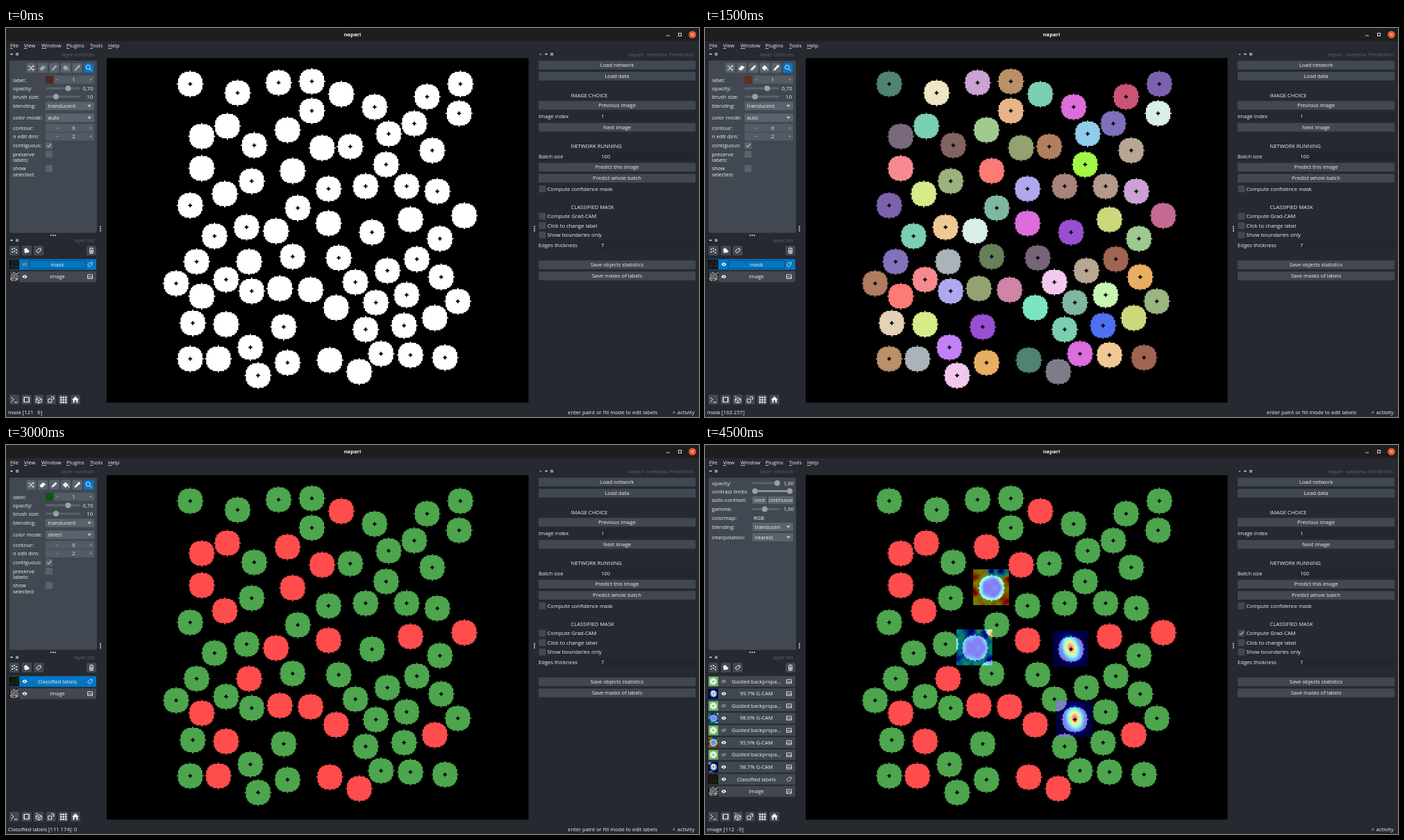
Recreate the animation shown at these times as an HTML page with a canvas. Size 998 px wide and 561 px high, loop 6 s.

```html
<!DOCTYPE html>
<html lang="en">
<head>
<meta charset="utf-8">
<title>napari</title>
<style>
html, body { margin: 0; width: 100%; height: 100%; overflow: hidden; background: #262930; }
canvas { display: block; }
</style>
</head>
<body>
<canvas id="stage" width="998" height="561"></canvas>
<script>
const ctx = document.getElementById('stage').getContext('2d');
const BG = '#262930', PANEL = '#414851', FIELD = '#5a626c', INK = '#f0f1f2',
  DIM = '#7d858c', FAINT = '#5d636c', BLUE = '#0077c6';
const PX = 1.844, LEFT = 245, TOP = 77;   // view of the image: pixel size and origin

// Cells with a dark cross: column, row, label colour
const marked = [
  [11, 2, '#4f8374'], [48, 9, '#eee6c4'], [80, 1, '#cba2d4'], [106, 0, '#bb9069'], [155, 20, '#dc6ddb'],
  [196, 12, '#cb5474'], [222, 2, '#7c62ae'], [221, 25, '#daeee8'], [106, 23, '#e7b588'], [186, 33, '#8070b9'],
  [166, 41, '#8fcdea'], [61, 50, '#836362'], [136, 51, '#b17e60'], [200, 54, '#b8a693'], [164, 65, '#a2f846'],
  [59, 78, '#9cb37e'], [119, 84, '#b0a8ee'], [148, 82, '#a8837a'], [180, 82, '#b39a8b'], [204, 86, '#cba3d3'],
  [11, 97, '#7c62ae'], [95, 99, '#7fb8a0'], [55, 114, '#efc995'], [30, 121, '#7bcfb1'], [153, 118, '#984fd1'],
  [206, 123, '#9eca92'], [16, 141, '#8272bb'], [91, 137, '#67805a'], [127, 138, '#766578'], [188, 139, '#a06550'],
  [165, 148, '#b8a793'], [207, 153, '#e9ae62'], [0, 158, '#b17b5f'], [39, 155, '#f68a90'], [59, 164, '#b0a8ee'],
  [140, 157, '#f3c8ee'], [156, 173, '#7fb8a0'], [180, 167, '#c8f5b4'], [220, 172, '#9ab580'], [13, 189, '#e4d1b6'],
  [84, 192, '#984fd1'], [148, 194, '#7bcfb1'], [178, 191, '#4f70f0'], [58, 208, '#c281f6'], [11, 217, '#bb9069'],
  [87, 220, '#e9ae62'], [64, 230, '#f3c8ee'], [160, 213, '#dc6ddb'], [183, 214, '#efc995'], [210, 216, '#a06550']];
const plain = [
  [129, 10, '#7bcfb1'], [40, 35, '#7bcfb1'], [20, 43, '#7a697c'], [87, 38, '#9fcb91'], [114, 52, '#92a371'],
  [20, 68, '#f68a90'], [91, 70, '#fc7b74'], [38, 88, '#d6ec88'], [119, 111, '#dc6ddb'], [183, 108, '#cdd87c'],
  [225, 105, '#c46a92'], [78, 117, '#daeee8'], [57, 141, '#abb3b9'], [20, 168, '#fc7b74'], [81, 162, '#92a371'],
  [105, 163, '#cf84a8'], [125, 177, '#7be5c1'], [202, 185, '#cdd87c'], [39, 190, '#d6ec88'], [33, 217, '#abb3b9'],
  [120, 218, '#4f8374'], [143, 227, '#7f7c8a']];
const cells = [...marked.map(c => [...c, true]), ...plain.map(c => [...c, false])];

const disk = new Path2D();
for (let dy = 0; dy <= 10; dy++) {
  const w = Math.floor(Math.sqrt(100 - dy * dy)) + .5;
  disk.rect(-w, -dy - .5, 2 * w, 2 * dy + 1);
}

const icons = {
  shuffle: 'M-4-2.5h2l3.5 5h2M-4 2.5h2l3.5-5h2M2.5-4l1.5 1.5L2.5-1M2.5 1L4 2.5 2.5 4',
  tag: 'M-3.5 1L0-2.7l3-.3v3L-.5 3.5z',
  picture: 'M-3.5-2.8h7v5.6h-7zM-3 2l2-2.5 2 1.7 1-1L3 2',
  zoom: 'M2-1A3 3 0 1 1-4-1 3 3 0 1 1 2-1M1 1l3.3 3.3',
  trash: 'M-3-3h6M-1-4h2M-2.5-2l.4 6h4.2l.4-6M-.8-1v4M.8-1v4',
  console: 'M-4.5-3.5L-1 0l-3.5 3.5M0 3.8h4.5',
  square: 'M-3.5-3.5h7v7h-7z',
  cube: 'M-4-1L0-3l4 2v4L0 5l-4-2zM-4-1l4 2 4-2M0 1v4M-4-4l2-1',
  turn: 'M-4-1h5v5h-5zM0-4h4v4M2.5-1.5L4 0',
  check: 'M-2.6 0l2 2.2L2.8-2.4',
  cross: 'M-1.8-1.8l3.6 3.6M1.8-1.8l-3.6 3.6',
  eraser: 'M-4.5 1L0-3.5 4.5-1 0 3.5h-3z',
  brush: 'M-4 4l1-3 5-5 2 2-5 5z',
  bucket: 'M-4.5 0l4-4L4 0-.5 4zM4 1l1.2 2.6H3z',
  picker: 'M-4 4l.6-2.4 4-4 1.8 1.8-4 4zM0-3l3 3 1.5-2.5L2.5-4.500z',
  eye: 'M-3.7 0Q0-4.800 3.7 0 0 4.800-3.700 0z',
  shape: 'M-4-2l3-2 5 5-2 2-5 .5z',
  home: 'M-5 0L0-4.800 5 0H3.500v4.500h-2.300V1h-2.400v3.500h-2.300V0z',
  arrow: 'M-3-1.800h6L0 1.900z'
};
const solid = ['eraser', 'brush', 'bucket', 'picker', 'eye', 'shape', 'home', 'arrow'];

function box(x, y, w, h, color, r = 1) {
  ctx.fillStyle = color;
  ctx.beginPath();
  ctx.roundRect(x, y, w, h, r);
  ctx.fill();
}
function dot(x, y, r, color) {
  ctx.fillStyle = color;
  ctx.beginPath();
  ctx.arc(x, y, r, 0, 7);
  ctx.fill();
}
function text(s, x, y, align = 'left', color = INK, font = '7.6px') {
  ctx.font = font + ' "Open Sans", "Noto Sans", sans-serif';
  ctx.textAlign = align;
  ctx.fillStyle = color;
  ctx.fillText(s, x, y + 2.6);
}
function icon(name, x, y, color = INK) {
  ctx.save();
  ctx.translate(x, y);
  ctx.fillStyle = ctx.strokeStyle = color;
  const path = new Path2D(icons[name]);
  if (solid.includes(name)) ctx.fill(path); else ctx.stroke(path);
  ctx.restore();
}
function iconButton(name, x, y, color, bg = PANEL) {
  box(x - 7, y - 7, 14, 14, bg, 1.5);
  if (name) icon(name, x, y, color);
}
function button(s, y, x = 767, w = 226) {
  box(x, y - 6.3, w, 12.6, PANEL);
  text(s, x + w / 2, y, 'center');
}
function checkbox(x, y, on, bg) {
  box(x - 5, y - 5, 10, 10, bg);
  if (on) icon('check', x, y);
}
function slider(x, y, w, ...knobs) {
  box(x, y - 1.5, w, 3, FIELD, 1.5);
  if (knobs[1]) box(knobs[0], y - 1.5, knobs[1] - knobs[0], 3, '#868e93');
  knobs.forEach(k => dot(k, y, 4, '#9ba1a7'));
}
function spin(value, x, y) {
  box(x, y - 5.7, 127 - x, 11.4, '#535b65');
  text('−', 74, y, 'center', '#b5babf');
  text(value, 97.5, y, 'center');
  text('+', 122, y, 'center', '#b5babf');
}
function combo(value, x, y) {
  box(x, y - 6, 127 - x, 12, FIELD);
  text(value, x + 3.5, y);
  icon('arrow', 120, y, '#b9bec3');
}

const clamp = v => Math.max(0, Math.min(1, v));
const jet = v => [3, 2, 1].map(k => 255 * clamp(1.5 - Math.abs(4 * clamp(v) - k)));
const hot = tilt => (x, y) => .88 * Math.exp(-(x * x + .55 * (y + 1) ** 2 - tilt * x * y) / 33);
// Cold centre, uneven surroundings; blobs are [x, y, radius, height]
const cold = (level, blobs) => (x, y) => {
  const r = Math.hypot(x, y), edge = clamp((r - 6.5) / 4.5);
  let v = level + .07 * Math.sin(x * .8 + y * .3) * Math.cos(y * .7);
  for (const [bx, by, br, h] of blobs) v += h * Math.exp(-((x - bx) ** 2 + (y - by) ** 2) / br / br);
  return .13 + .04 * Math.sin(x * .6) * Math.cos(y * .5) + (v - .13) * edge;
};
const maps = [
  { x: 153, y: 118, heat: hot(.35) },
  { x: 78, y: 117, heat: cold(.38, [[-4, -13, 4, -.3], [8, -10, 4, -.25], [13, -11, 3, .5], [-13, 7, 4, -.2], [12, 9, 4, -.25]]) },
  { x: 91, y: 70, heat: cold(.64, [[0, -13, 3, -.55], [7, -13, 4, -.5], [13, -13, 3, -.3], [-14, 3, 3, .3], [-14, -9, 3, .25], [13, -6, 3, .3], [11, 10, 4, .25]]) },
  { x: 156, y: 173, heat: hot(.15) }];

function heatmap(map, cx, cy, s) {
  for (let y = -14; y < 14; y++) for (let x = -14; x < 14; x++) {
    const hit = cells.find(c => Math.hypot(map.x + x - c[0], map.y + y - c[1]) <= 10);
    const core = hit && hit[3] && Math.abs(map.x + x - hit[0]) + Math.abs(map.y + y - hit[1]) <= 1;
    const rgb = jet(map.heat(x, y)).map(v => core ? 0 : (v + (hit ? 255 : 0)) / 2);
    ctx.fillStyle = `rgb(${rgb})`;
    ctx.fillRect(cx + (x - .5) * s, cy + (y - .5) * s, s + (x < 13 ? .4 : 0), s + (y < 13 ? .4 : 0));
  }
}

const classColor = c => c[3] ? '#4da64d' : '#ff4d4d';

function drawCells(color) {
  for (const c of cells) {
    ctx.save();
    ctx.translate(LEFT + c[0] * PX, TOP + c[1] * PX);
    ctx.scale(PX, PX);
    ctx.fillStyle = color(c);
    ctx.fill(disk);
    if (c[3]) {
      ctx.fillStyle = '#000';
      ctx.fillRect(-1.5, -.5, 3, 1);
      ctx.fillRect(-.5, -1.5, 1, 3);
    }
    ctx.restore();
  }
}

function thumbnail(kind, y) {
  if (kind.heat) return heatmap(kind, 12.2, y + .2, .5);
  if (kind === 'guided') {
    box(5, y - 7, 14, 14, '#69b569', 0);
    dot(12, y, 5, '#d9f4d4');
    return dot(12, y, 1, '#3b7a3b');
  }
  box(5, y - 7, 14, 14, '#000', 0);
  ctx.globalAlpha = kind === 'image' ? 1 : .45;
  for (const c of cells) {
    ctx.fillStyle = kind === 'classes' ? classColor(c) : kind === 'image' ? '#fff' : '#999';
    ctx.fillRect(5.5 + c[0] / 18.5, y - 6.5 + c[1] / 19, 1.1, .9);
  }
  ctx.globalAlpha = 1;
}

function layer(i, name, thumb, { selected, editing, hidden, type = 'picture' } = {}) {
  const y = 341 + i * 17.63, bg = selected ? BLUE : PANEL;
  box(5, y - 7.8, 125, 15.6, bg);
  thumbnail(thumb, y);
  if (editing) {
    ctx.strokeStyle = '#174a75';
    ctx.strokeRect(33.5, y - 5.5, 81, 11);
  }
  icon('eye', 27, y, hidden ? DIM : INK);
  dot(27, y, 1, bg);
  if (hidden) {
    ctx.strokeStyle = DIM;
    ctx.beginPath();
    ctx.moveTo(24, y + 2.5);
    ctx.lineTo(30, y - 2.5);
    ctx.stroke();
  }
  text(name, 74, y, 'center');
  icon(type, 121, y, '#d5d8da');
}

function dockTitle(s, right, x, y, closable) {
  text(s, right, y, 'right', FAINT, '7.5px');
  if (closable) text('×', x - 8, y - .5, 'center', INK, '6px');
  box(x - 1.7, y - 1.2, 3.4, 1.6, '#d0d3d6', .5);
  ctx.strokeStyle = '#d0d3d6';
  ctx.strokeRect(x + 6.8, y - 1.5, 2.5, 2.5);
}

function drawFrame() {
  box(0, 0, 998, 561, BG, 0);
  box(0, 0, 998, 19, '#1f1e1e', 0);
  text('napari', 499, 9.5, 'center', INK, '700 7.6px');
  box(951, 10.5, 5, 1, '#d8d8d8', 0);
  ctx.strokeStyle = '#d8d8d8';
  ctx.strokeRect(968.5, 7.5, 4, 4);
  dot(988.500, 9.500, 5.300, '#e95a2b');
  icon('cross', 988.500, 9.500);

  [['File', 6], ['View', 26], ['Window', 51], ['Plugins', 87], ['Tools', 121], ['Help', 147]].forEach(([s, x]) => {
    text(s, x, 25.500);
    box(x, 29.300, ctx.measureText(s[0]).width, .7, INK, 0);
  });

  dockTitle('layer controls', 127, 8, 38);
  dockTitle('layer list', 127, 8, 306.500);
  dockTitle('napari  svetlana: Prediction', 991, 778, 38, true);
  [-3, 0, 3].forEach(d => {
    dot(68 + d, 299, .9, INK);
    dot(136, 289.500 + d, .9, INK);
    dot(761, 289.500 + d, .9, INK);
  });

  iconButton('', 12, 321);
  [[-3, -2], [0, -3], [3, -1], [-3, 2], [0, 1], [3, 3]].forEach(([x, y]) => dot(12 + x, 321 + y, 1, INK));
  iconButton('shape', 30, 321);
  iconButton('tag', 47, 321);
  iconButton('trash', 123, 321);
  ['console', 'square', 'cube', 'turn', '', 'home'].forEach((n, i) => iconButton(n, 12 + i * 17.600, 536));
  for (let i = 0; i < 9; i++) box(78 + i % 3 * 3.500, 531.600 + Math.floor(i / 3) * 3.500, 2.400, 2.400, INK, 0);
  icon('square', 29.600, 536);
}

function drawPlugin(gradCam) {
  [['Load network', 53.500], ['Load data', 69.500], ['Previous image', 111.500], ['Next image', 143.200],
   ['Predict this image', 200.800], ['Predict whole batch', 216.800], ['Save objects statistics', 341.500],
   ['Save masks of labels', 357.500]].forEach(([s, y]) => button(s, y));
  [['IMAGE CHOICE', 97], ['NETWORK RUNNING', 170.500], ['CLASSIFIED MASK', 258]].forEach(([s, y]) => text(s, 813.500, y));
  [['Image index', '1', 127.500], ['Batch size', '100', 185], ['Edges thickness', '7', 313]].forEach(([s, v, y]) => {
    box(854, y - 6, 139, 12, '#22252b');
    text(s, 767, y);
    text(v, 857, y);
  });
  [['Compute confidence mask', 232], ['Compute Grad-CAM', 271.500, gradCam], ['Click to change label', 285],
   ['Show boundaries only', 298.500]].forEach(([s, y, on]) => {
    checkbox(772.500, y, on, PANEL);
    text(s, 779.500, y);
  });
}

const caption = (s, y) => text(s, 10, y);

function labelControls({ swatch, mode, disabled }) {
  ['shuffle', 'eraser', 'brush', 'bucket', 'picker', 'zoom'].forEach((n, i) =>
    iconButton(n, 36.300 + i * 16.600, 57.500, disabled && i > 0 && i < 5 ? '#a0a5aa' : INK, i === 5 ? BLUE : FIELD));
  [['label:', 75], ['opacity:', 87], ['brush size:', 99], ['blending:', 112.500], ['color mode:', 129.500],
   ['contour:', 144], ['n edit dim:', 156.500], ['contiguous:', 169.500], ['preserve', 182], ['labels:', 190.500],
   ['show', 202.500], ['selected:', 211]].forEach(([s, y]) => caption(s, y));
  box(57, 69.300, 11, 11, swatch, 0);
  spin('1', 69, 74.500);
  slider(57, 87, 50, 89.500);
  text('0,70', 125.500, 87, 'right');
  slider(57, 99, 50, 72);
  text('10', 125, 99, 'right');
  combo('translucent', 57, 112.500);
  combo(mode, 57, 129.500);
  spin('0', 57, 144);
  spin('2', 57, 156.500);
  checkbox(62, 169.500, true, FIELD);
  checkbox(62, 182, false, FIELD);
  checkbox(62, 202.500, false, FIELD);
}

function imageControls() {
  [['opacity:', 55], ['contrast limits:', 67], ['auto-contrast:', 79.500], ['gamma:', 92.500], ['colormap:', 105],
   ['blending:', 118], ['interpolation:', 133]].forEach(([s, y]) => caption(s, y));
  slider(68, 55, 40, 104);
  text('1,00', 113, 55);
  slider(68, 66.500, 58, 72, 122);
  [['once', 68, 21], ['continuous', 91, 36]].forEach(([s, x, w]) => {
    box(x, 74, w, 11, FIELD);
    text(s, x + w / 2, 79.500, 'center', INK, '6.700px');
  });
  slider(68, 92.500, 40, 86);
  text('1,00', 113, 92.500);
  text('RGB', 70, 105);
  combo('translucen', 68, 118);
  combo('nearest', 68, 133);
}

const scenes = [
  { color: () => '#fff', swatch: '#4f281c', mode: 'auto', disabled: true, status: 'mask [121   6]' },
  { color: c => c[2], swatch: '#5e2f24', mode: 'auto', status: 'mask [163 257]' },
  { color: classColor, swatch: '#0b560d', mode: 'direct', classes: true, status: 'Classified labels [111 174]: 0' },
  { color: classColor, gradCam: true, status: 'image [112  -9]' }];

function draw(scene) {
  drawFrame();
  drawPlugin(scene.gradCam);
  box(5, 47, 126, 248.500, PANEL, 2);
  box(145, 43.500, 607.500, 496.700, '#000', 0);
  drawCells(scene.color);

  if (scene.gradCam) {
    imageControls();
    maps.forEach(m => heatmap(m, LEFT + m.x * PX, TOP + m.y * PX, PX));
    ['99.7%', '98.6%', '95.9%', '98.7%'].forEach((p, i) => {
      layer(2 * i, 'Guided backpropa…', 'guided', { hidden: true });
      layer(2 * i + 1, p + ' G-CAM', maps[i]);
    });
    layer(8, 'Classified labels', 'classes', { type: 'tag' });
    layer(9, 'image', 'image');
  } else {
    labelControls(scene);
    if (scene.classes) layer(0, 'Classified labels', 'classes', { selected: true, type: 'tag' });
    else layer(0, 'mask', 'mask', { selected: true, editing: true, hidden: scene.disabled, type: 'tag' });
    layer(1, 'image', 'image');
    text('enter paint or fill mode to edit labels', 938, 554.500, 'right');
  }
  text(scene.status, 3, 554);
  text('activity', 991.500, 554.500, 'right');
  text('^', 960, 555.500, 'left', INK, '7px');
}

let shown;
function tick() {
  const scene = scenes[Math.floor(performance.now() / 1500) % scenes.length];
  if (scene !== shown) draw(shown = scene);
  requestAnimationFrame(tick);
}
tick();
</script>
</body>
</html>
```
